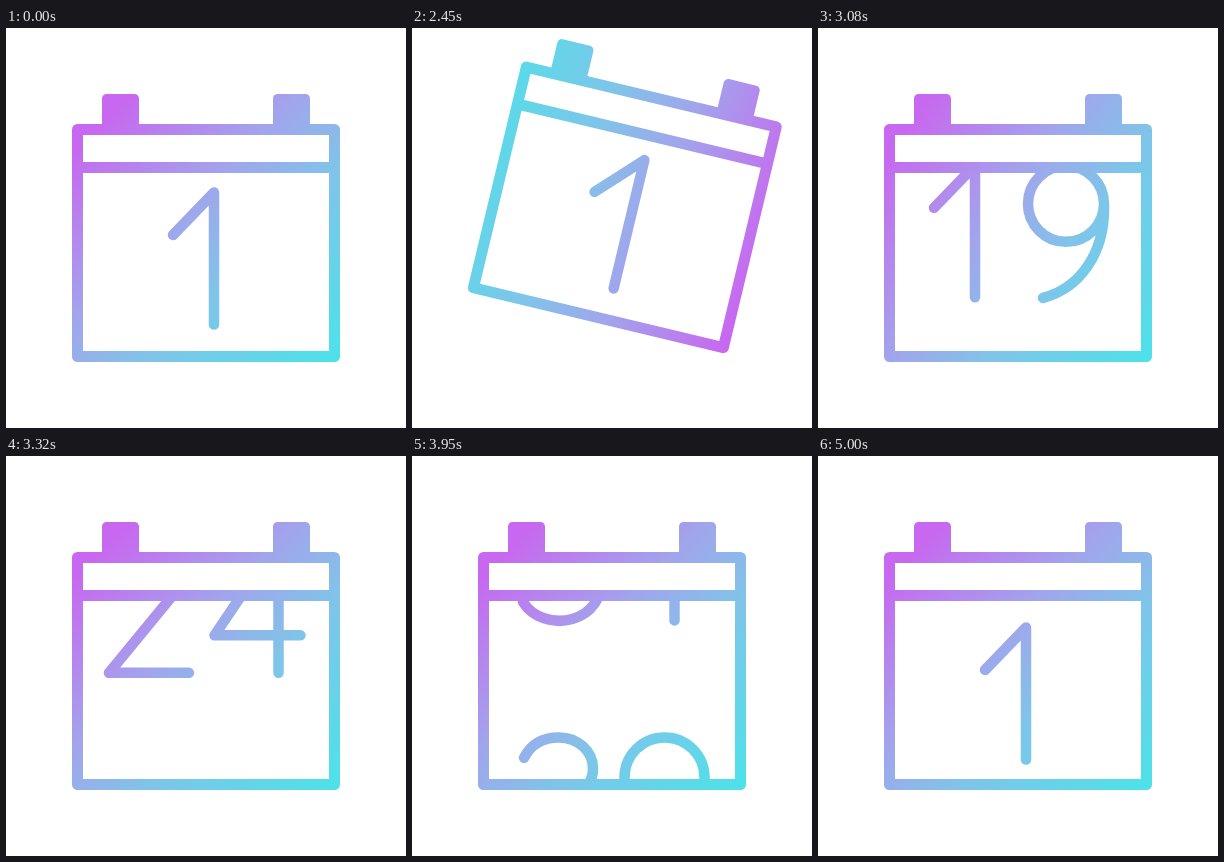
Write an HTML page with a canvas that moves like this. It is 400 by 400 pixels and loops after 5.03 s.

```html
<!DOCTYPE html>
<html lang="en">
<head>
<meta charset="utf-8">
<title>Calendar</title>
<style>
  html, body { margin: 0; width: 100%; height: 100%; overflow: hidden; background: #fff; }
  canvas { display: block; width: 100vmin; height: 100vmin; }
</style>
</head>
<body>
<canvas></canvas>
<script>
const LOOP = 5030, STILL = 2030, STEP = 30, SIZE = 400;
const ROW = 249, TOP = 164.5;
const canvas = document.querySelector('canvas');
const ctx = canvas.getContext('2d');

// Digit strokes: x from the centre of the slot, y from the top
const digits = [
  'M-40 40A40 40 0 0 1 40 40V92.5A40 40 0 0 1 -40 92.5Z',
  'M-31 42.5L10 0V132',
  'M-37.5 33A33 33 0 1 1 20.5 54L-44 132.5H36',
  'M-35 20.5Q-25 0 0 0A34 31 0 0 1 0 62A41 35.2 0 1 1 -36 113.5',
  'M20 132.5V0L-44 95H42',
  'M31 0H-23L-31 58A40 40 0 1 1 -36 109',
  'M28 0C-9 9.5 -35 44 -33.5 94A38 38 0 1 0 42.5 94A38 38 0 1 0 -33.5 94',
  'M-31.5 0H32L-7.5 132.5',
  'M0 0A32 30 0 0 1 0 60A32 30 0 0 1 0 0ZM0 60A40 36.2 0 0 1 0 132.5A40 36.2 0 0 1 0 60Z',
  'M33.5 38.5A38 38 0 1 0 -42.5 38.5A38 38 0 1 0 33.5 38.5C35 88 9 123 -27.5 132.5'
].map(d => new Path2D(d));

const clamp = x => Math.min(1, Math.max(0, x));
const span = (t, a, b) => clamp((t - a) / (b - a));
const wave = x => (1 - Math.cos(Math.PI * x)) / 2;
const rise = x => 0.7 * x * (1 - x) ** 2 + x * x * (3 - 2 * x);

// Tilt and hop: up, down past the rest pose, then settle
function swing(t) {
  if (t < 2480) return rise(span(t, 2000, 2480));
  if (t < 2760) return 1 - 1.17 * wave(span(t, 2480, 2760));
  return -0.17 * (1 - wave(span(t, 2760, 3080)));
}

// Rows travelled, slightly past the last one
function scroll(t) {
  const end = 4793;
  const p = span(t, 2512, end);
  const back = 2 * span(t, end, 5000) ** 2;
  return (1 - (1 - p) ** 3) * (31 + 9 / ROW) - back / ROW;
}

function drawDigit(digit, x, y) {
  ctx.save();
  ctx.translate(x, y);
  ctx.stroke(digits[digit]);
  ctx.restore();
}

function drawDay(day, y) {
  if (day < 10) return drawDigit(day, 198, y);
  drawDigit(Math.floor(day / 10), 147, y);
  drawDigit(day % 10, 252.5, y);
}

function drawDays(rows) {
  ctx.save();
  ctx.beginPath();
  ctx.rect(77, 140, 246, 188);
  ctx.clip();
  ctx.lineWidth = 10.5;
  const first = Math.floor(rows);
  for (const i of [first, first + 1]) drawDay(i % 31 + 1, TOP + (rows - i) * ROW);
  ctx.restore();
}

function drawFrame() {
  ctx.lineWidth = 11;
  ctx.strokeRect(71.5, 101.5, 257, 227);
  ctx.beginPath();
  ctx.moveTo(72, 139.5);
  ctx.lineTo(328, 139.5);
  ctx.stroke();
  ctx.beginPath();
  for (const x of [96, 267]) ctx.roundRect(x, 66, 37, 36, [4.5, 4.5, 0, 0]);
  ctx.fill();
}

// Colours everything already drawn
function tint(turn) {
  const a = Math.PI * (0.25 + 2 * turn);
  const x = Math.cos(a), y = Math.sin(a);
  const g = ctx.createLinearGradient(200 - 150 * x, 200 - 150 * y, 200 + 175 * x, 200 + 175 * y);
  g.addColorStop(0, '#c867ef');
  g.addColorStop(0.37, '#a2a4ec');
  g.addColorStop(0.62, '#80c4e9');
  g.addColorStop(1, '#50e0e9');
  ctx.globalCompositeOperation = 'source-in';
  ctx.fillStyle = g;
  ctx.fillRect(-SIZE, -SIZE, SIZE * 3, SIZE * 3);
}

function draw(t) {
  const px = Math.round(canvas.clientWidth * devicePixelRatio) || SIZE;
  canvas.width = canvas.height = px;
  ctx.scale(px / SIZE, px / SIZE);
  ctx.lineCap = ctx.lineJoin = 'round';

  const s = t < STILL ? 0 : swing(t);
  ctx.translate(200, 270 - 37.5 * s);
  ctx.rotate(13.6 * s * Math.PI / 180);
  ctx.translate(-200, -270);

  drawDays(scroll(t));
  drawFrame();
  tint(t < STILL ? 0 : span(t, 2010, 3110));
}

const start = performance.now();
function tick() {
  const t = (performance.now() - start) % LOOP;
  draw(t < STILL ? 0 : STILL + Math.floor((t - STILL) / STEP) * STEP);
  requestAnimationFrame(tick);
}
tick();
</script>
</body>
</html>
```
